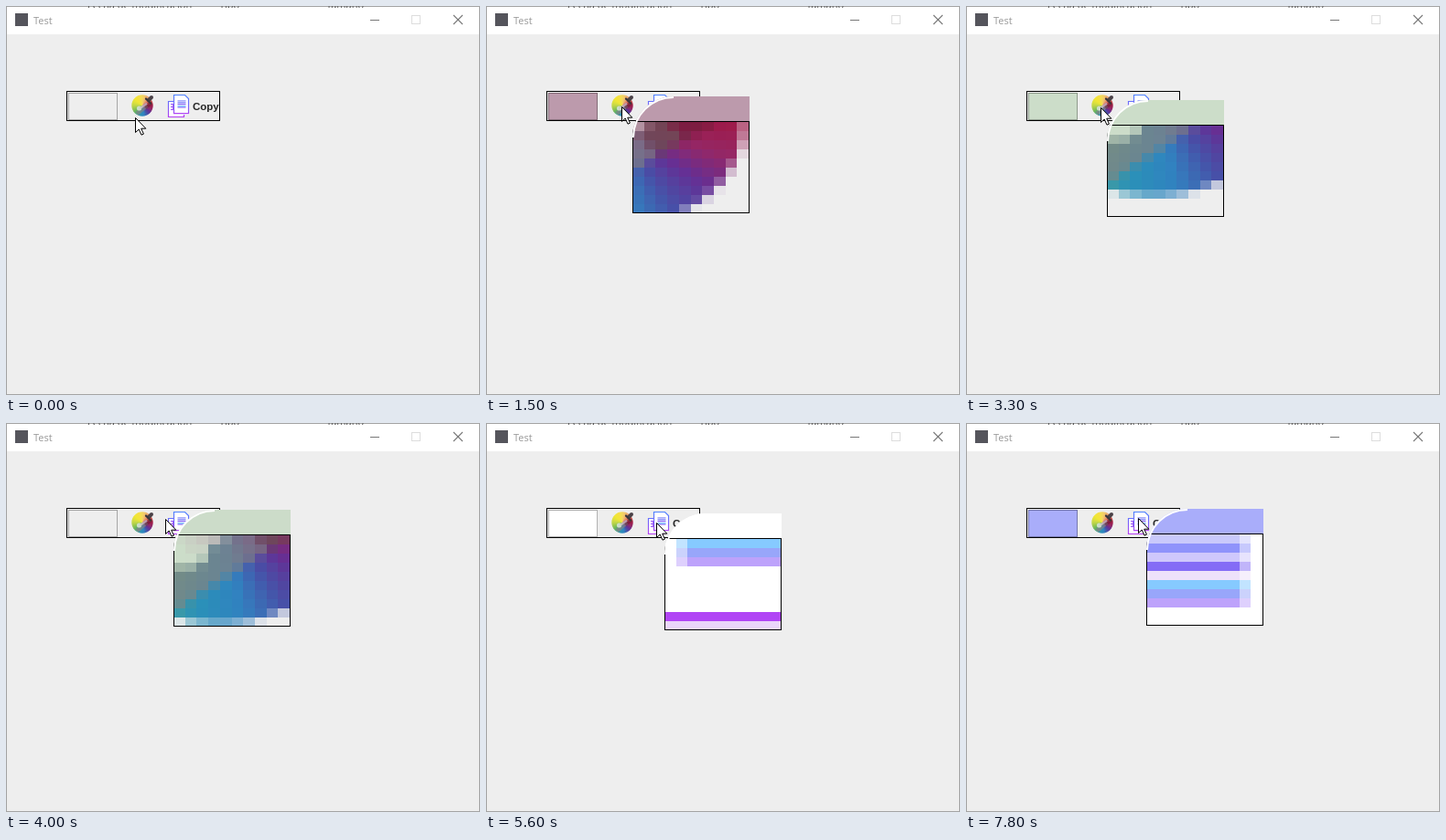
Recreate the animation shown at these times as an HTML page with a canvas. Size 518 by 426 pixels, loop 8000 ms.

```html
<!DOCTYPE html>
<html lang="en">
<head>
<meta charset="utf-8">
<title>Test</title>
<style>
html, body { margin: 0; width: 100%; height: 100%; overflow: hidden; background: #eee; }
canvas { display: block; width: 518px; height: 426px; }
</style>
</head>
<body>
<canvas id="stage" width="518" height="426"></canvas>
<script>
const LOOP = 8000, STEP = 100, OPEN_AT = 500, W = 518, H = 426;
const ctx = document.getElementById('stage').getContext('2d');
const base = Object.assign(document.createElement('canvas'), { width: W, height: H });
const baseCtx = base.getContext('2d', { willReadFrequently: true });

// Key points of the pointer: [ms, x, y].
const path = [
  [100, 141, 122], [200, 166, 112], [300, 166, 112], [400, 143, 115], [1000, 151, 106], [1200, 151, 109],
  [1500, 151, 109], [1600, 148, 110], [2100, 139, 117], [2600, 139, 117], [2700, 138, 116],
  [3000, 146, 112], [3200, 145, 113], [3300, 145, 113], [3400, 147, 111], [3900, 145, 111],
  [4000, 174, 105], [4500, 174, 105], [4700, 185, 108], [5600, 186, 109], [5800, 186, 109],
  [5900, 195, 106], [6200, 145, 99], [7200, 145, 99], [7400, 195, 102], [7500, 188, 104]
];

function pointer(t) {
  const next = path.findIndex(key => key[0] >= t);
  if (next < 1) return path.at(next).slice(1);
  const [t0, x0, y0] = path[next - 1], [t1, x1, y1] = path[next];
  const k = (t - t0) / (t1 - t0);
  return [Math.round(x0 + (x1 - x0) * k), Math.round(y0 + (y1 - y0) * k)];
}

function pick([x, y]) {
  const [r, g, b] = baseCtx.getImageData(x, y - 1, 1, 1).data;
  return `rgb(${r},${g},${b})`;
}

function rect(c, color, x, y, w, h) {
  c.fillStyle = color;
  c.fillRect(x, y, w, h);
}

function frame(c, color, x, y, w, h) {
  c.strokeStyle = color;
  c.lineWidth = 1;
  c.strokeRect(x + .5, y + .5, w - 1, h - 1);
}

function line(c, color, width, ...points) {
  c.beginPath();
  for (let i = 0; i < points.length; i += 2) c.lineTo(points[i], points[i + 1]);
  c.strokeStyle = color;
  c.lineWidth = width;
  c.stroke();
}

function disc(c, color, x, y, r) {
  c.beginPath();
  c.arc(x, y, r, 0, 7);
  c.fillStyle = color;
  c.fill();
}

function text(c, str, x, y, font, color) {
  c.font = font;
  c.fillStyle = color;
  c.fillText(str, x, y);
}

function spread(gradient, ...colors) {
  colors.forEach((color, i) => gradient.addColorStop(i / (colors.length - 1), color));
  return gradient;
}

function drawWindow(c) {
  rect(c, '#eee', 0, 0, W, H);
  rect(c, '#fff', 0, 0, W, 31);
  frame(c, '#a3a3a3', 0, 0, W, H);
  const behind = '11px "Open Sans", sans-serif';
  text(c, 'Fecha de modificación', 89, 3, behind, '#555');
  text(c, 'Tipo', 233, 3, behind, '#555');
  text(c, 'Tamaño', 350, 3, behind, '#555');
  rect(c, '#fff', 1, 2, W - 2, 10);
  rect(c, '#55555c', 10, 8, 14, 14);
  text(c, 'Test', 30, 20, '11px "Open Sans", sans-serif', '#999');
  rect(c, '#777', 398, 15, 10, 1);
  frame(c, '#ddd', 443, 10, 10, 10);
  line(c, '#777', 1.1, 489, 10, 499, 20);
  line(c, '#777', 1.1, 499, 10, 489, 20);
}

function drawWheel(c) {
  // Evenly spaced hues, clockwise from the right.
  const hues = spread(c.createConicGradient(0, 149, 109),
    '#a01a48', '#942766', '#652f94', '#4751a8', '#3182c0', '#2a90b8', '#46a498', '#68b560', '#98c850',
    '#c2d648', '#dde03e', '#f0e635', '#f4e23c', '#f4dc55', '#f2cc68', '#eaa870', '#de7a60', '#c24848', '#a01a48');
  c.save();
  disc(c, hues, 149, 109, 11.7);
  c.clip();
  line(c, 'rgba(135,130,128,.7)', 4.5, 143, 118, 154, 109);
  line(c, 'rgba(85,30,50,.45)', 4, 152, 111, 159, 106);
  c.restore();
  disc(c, '#ccddc9', 145.5, 112, 2.6);
  const body = spread(c.createLinearGradient(145.5, 112.5, 151.5, 108.5), '#ccddc9', '#bc9aac');
  line(c, body, 2.4, 145.5, 112.5, 154, 106.8);
  c.lineCap = 'round';
  line(c, '#4a4248', 4, 156, 103, 159, 100);
  line(c, '#39343a', 2.2, 153, 101.5, 158, 106.5);
  c.lineCap = 'butt';
}

function drawPage(c, ink, x, y, w, h, cut) {
  c.beginPath();
  c.moveTo(x, y);
  c.lineTo(x + w - cut, y);
  c.lineTo(x + w, y + cut);
  c.lineTo(x + w, y + h);
  c.lineTo(x, y + h);
  c.closePath();
  c.fillStyle = '#fff';
  c.fill();
  c.strokeStyle = ink;
  c.lineWidth = 1.2;
  c.stroke();
}

function drawPages(c) {
  const ink = spread(c.createLinearGradient(0, 97, 0, 122), '#4d84ff', '#7a63fa', '#b43cf0');
  drawPage(c, ink, 177.5, 104.5, 17, 17, 0);
  drawPage(c, ink, 183.5, 97.5, 16, 20, 4);
  rect(c, '#b145f5', 183, 117, 17, 1);
  rect(c, '#ead6fa', 183, 118, 17, 1);
  const rows = ['#a9adfa', '#c9c9fb', '#8f93fb', '#cfc8fc', '#846cf6', '#eee2fa', '#86caff', '#98a6fa', '#bda2fb'];
  rows.forEach((color, i) => {
    rect(c, color, 188, 103 + i, 8, 1);
    c.globalAlpha = .5;
    rect(c, color, 187, 103 + i, 1, 1);
    rect(c, color, 196, 103 + i, 1, 1);
    c.globalAlpha = 1;
  });
  for (const y of [107, 110, 113]) rect(c, '#9b58f5', 180, y, 3, 1);
  rect(c, '#9b58f5', 182, 108, 1, 6);
}

function drawToolbar(c) {
  frame(c, '#000', 66, 93, 168, 33);
  drawWheel(c);
  drawPages(c);
  text(c, 'Copy', 204, 114, 'bold 11.5px "Liberation Sans", sans-serif', '#262626');
}

function drawButton(color) {
  rect(ctx, color, 68, 95, 54, 30);
  frame(ctx, 'rgba(0,0,0,.3)', 68, 95, 54, 30);
}

// Magnifies the 10 by 10 pixels at the sampled point, inside a shape with one round corner.
function drawPanel([px, py], sample) {
  const x = px + 9, y = py - 10, r = 45, size = 128;
  const corner = () => ctx.arc(x + r, y + r, r, Math.PI, Math.PI * 1.5);
  ctx.save();
  ctx.beginPath();
  ctx.moveTo(x, y + size);
  corner();
  ctx.lineTo(x + size, y);
  ctx.lineTo(x + size, y + size);
  ctx.closePath();
  ctx.clip();
  rect(ctx, pick(sample), x, y, size, size);
  ctx.imageSmoothingEnabled = false;
  ctx.drawImage(base, ...sample, 10, 10, x, y + 28, 127, 100);
  frame(ctx, '#000', x, y + 27, size, 101);
  ctx.beginPath();
  corner();
  ctx.strokeStyle = '#fff';
  ctx.lineWidth = 4;
  ctx.stroke();
  ctx.restore();
}

const arrow = new Path2D('M.5 .5V16.5L4.2 13L7 19.2L9.4 18.1L6.7 12.2H11.8Z');
function drawCursor([x, y]) {
  ctx.save();
  ctx.translate(x, y);
  ctx.fillStyle = '#fff';
  ctx.fill(arrow);
  ctx.strokeStyle = '#000';
  ctx.lineWidth = 1;
  ctx.stroke(arrow);
  ctx.restore();
}

// The panel trails the cursor by one step, and its contents by one more.
function render() {
  const t = Math.floor(performance.now() % LOOP / STEP) * STEP;
  const open = t >= OPEN_AT;
  ctx.drawImage(base, 0, 0);
  drawButton(open ? pick(pointer(t)) : '#eee');
  if (open) drawPanel(pointer(t), pointer(t - STEP));
  drawCursor(pointer(t + STEP));
  requestAnimationFrame(render);
}

drawWindow(baseCtx);
drawToolbar(baseCtx);
render();
</script>
</body>
</html>
```
